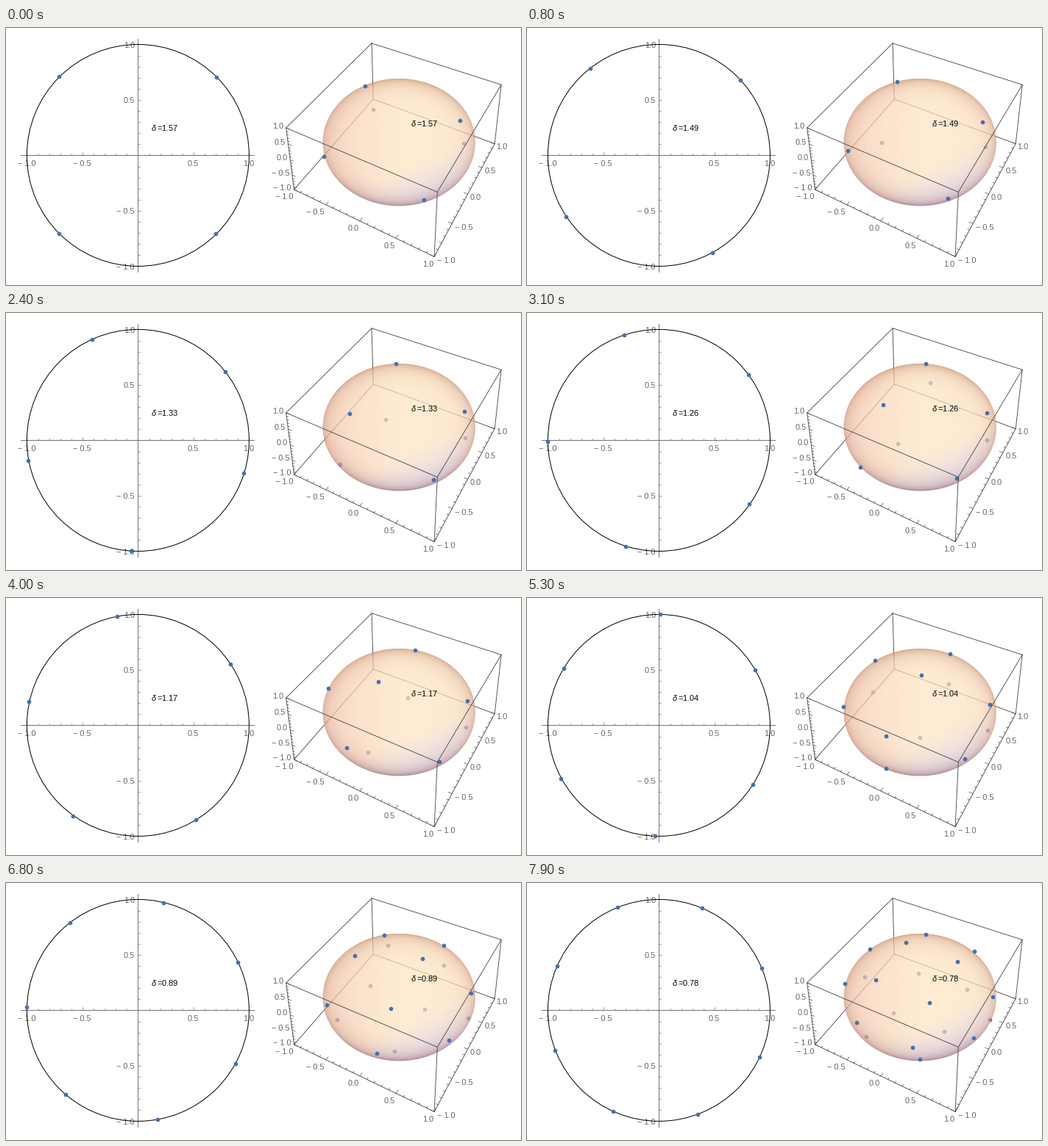
A matplotlib script for the animation above (8000 ms loop, 700 by 350 pixels).

```python
import numpy as np
import matplotlib.pyplot as plt
from matplotlib.animation import FuncAnimation
from matplotlib.patches import Circle

W, H, DPI = 700, 350, 100
PX = 72 / DPI                       # one pixel in points
GRAY, BLUE, EDGE = "#666666", "#4570ae", "#4c4c4c"
CX, CY, R = 179.4, 173.4, 151       # unit circle on the stage

plt.rcParams.update({
    "font.family": "Liberation Sans",
    "font.size": 11 * PX,
    "mathtext.fontset": "custom",
    "mathtext.rm": "Liberation Sans",
    "mathtext.it": "Liberation Sans:italic",
})

fig = plt.figure(figsize=(W / DPI, H / DPI), dpi=DPI, facecolor="white")
ax = fig.add_axes([0, 0, 1, 1])
ax.axis("off")


def line(p, q, color=EDGE, z=5, lw=0.9):
    ax.plot([p[0], q[0]], [p[1], q[1]], color=color, lw=lw * PX, zorder=z)


def label(x, y, s, ha="center", color=GRAY, z=6):
    return ax.text(x, y + 4, s, ha=ha, va="baseline", color=color, zorder=z)


def num(v):
    return f"{v:.1f}".replace("-", "\u2212 ")


def dots(z):
    return ax.plot([], [], "o", ms=5.7 * PX, mew=0, color=BLUE, zorder=z)[0]


# perspective camera looking at a 1 x 1 x 0.4 box
SCALE = np.array([0.5, 0.5, 0.2])
EYE = np.array([1.3, -2.4, 2.0])
DIST = np.linalg.norm(EYE)
FWD = -EYE / DIST
RIGHT = np.cross(FWD, [0, 0, 1])
RIGHT /= np.linalg.norm(RIGHT)
UP = np.cross(RIGHT, FWD)


def project(pts):
    p = np.asarray(pts, float) * SCALE
    depth = DIST + p @ FWD
    return np.stack([534.2 + 703 * (p @ RIGHT) / depth,
                     147.7 - 861 * (p @ UP) / depth], axis=-1)


def draw_plane():
    ax.add_patch(Circle((CX, CY), R, fill=False, ec="black",
                        lw=PX, zorder=2))
    line((20, 173), (337, 173), GRAY, 1)
    line((179, 15), (179, 332), GRAY, 1)
    for i in range(-10, 11):
        if i == 0:
            continue
        size = 4 if i % 5 == 0 else 2.5
        x, y = CX + R * i / 10, CY - R * i / 10
        line((x, 173), (x, 173 - size), GRAY, 1, 0.6)
        line((179, y), (179 + size, y), GRAY, 1, 0.6)
        if i % 5 == 0:
            label(x - 0.5, 184, num(i / 10), z=1)
            label(175, y + 0.5, num(i / 10), "right", z=1)


def draw_box():
    for a in (-1, 1):
        for b in (-1, 1):
            for p, q in (((-1, a, b), (1, a, b)),
                         ((a, -1, b), (a, 1, b)),
                         ((a, b, -1), (a, b, 1))):
                # edges meeting at the far bottom corner lie behind the ball
                back = (-1, 1, -1) in (p, q)
                line(*project([p, q]), z=1 if back else 5)

    for i in range(-10, 11):
        v, size = i / 10, 0.05 if i % 5 == 0 else 0.025
        line(*project([(v, -1, -1), (v, -1 + size, -1)]), lw=0.7)
        line(*project([(1, v, -1), (1 - size, v, -1)]), lw=0.7)
        line(*project([(-1, -1, v), (-1 + size, -1, v)]), lw=0.7)

    vals = (-1, -0.5, 0, 0.5, 1)
    xs = ((378, 229), (420, 250), (472, 272), (521, 296), (574, 321))
    ys = ((598, 316), (622, 271), (638, 230), (658, 194), (674, 161))
    zs = ((388, 217), (385.5, 197), (383, 176), (380, 155), (377, 133))
    for v, px, py, pz in zip(vals, xs, ys, zs):
        label(*px, num(v))
        label(*py, num(v))
        label(*pz, num(v), "right")


def draw_ball(opacity=0.72):
    x0, x1, y0, y1 = 425, 645, 62, 248
    x, y = np.meshgrid(np.arange(x0, x1) + 0.5, np.arange(y0, y1) + 0.5)
    u, v = (x - 534.2) / 103.6, (155.6 - y) / 86.7
    rho = np.hypot(u, v)
    w = np.sqrt(np.clip(1 - rho ** 2, 0, 1))
    s = v / np.maximum(rho, 1e-6)

    def mix(a, b, t):
        return a + (np.array(b) - a) * t[..., None]

    rim = mix(np.array([212, 164, 148.0]), (200, 150, 118),
              np.clip(s, 0, 1) ** 2)
    rim = mix(rim, (156, 114, 124), np.clip(-s, 0, 1) ** 2)
    face = mix(np.array([255, 236, 211.0]), (250, 219, 199),
               np.clip(-u, 0, 1))
    face = mix(face, (234, 226, 238),
               np.clip((0.5 * u - 0.85 * v - 0.4) / 0.55, 0, 1))
    seen = mix(rim, face, 1 - (1 - w) ** 2.4)

    rgba = np.empty(x.shape + (4,))
    # colour that gives the wanted tone over white
    rgba[..., :3] = np.clip((seen / 255 - 1 + opacity) / opacity, 0, 1)
    rgba[..., 3] = opacity * np.clip((1 - rho) * 95 + 0.5, 0, 1)
    ax.imshow(rgba, extent=(x0, x1, y1, y0),
              interpolation="nearest", aspect="auto", zorder=3)


def steps(d, end):
    return np.arange(d / 2, end, d)


def ball_points(d):
    """Rings around the x axis, spaced by about d along and across."""
    pts = []
    for phi in steps(d, np.pi):
        r = np.sin(phi)
        for t in steps(d / r, 2 * np.pi):
            pts.append((np.cos(phi), r * np.cos(t), r * np.sin(t)))
    return np.array(pts)


draw_plane()
draw_box()
draw_ball()
ring, far, near = dots(3), dots(2), dots(4)
texts = [label(x, y, "", color="black", z=7)
         for x, y in ((216, 136), (569, 130))]
ax.set(xlim=(0, W), ylim=(H, 0))


def update(k):
    d = (157 - k) / 100
    t = steps(d, 2 * np.pi)
    ring.set_data(CX - 0.5 + R * np.cos(t), CY - R * np.sin(t))

    pts = ball_points(d)
    xy = project(pts)
    front = pts @ (EYE / SCALE) > -1.3
    near.set_data(*xy[front].T)
    far.set_data(*xy[~front].T)

    value = f"{d:.2f}".rstrip("0")
    for txt in texts:
        txt.set_text(rf"$\mathit{{\delta}}\:$={value}")
    return ring, near, far, *texts


anim = FuncAnimation(fig, update, frames=80, interval=100,
                     repeat=True, repeat_delay=0)
plt.show()
```
